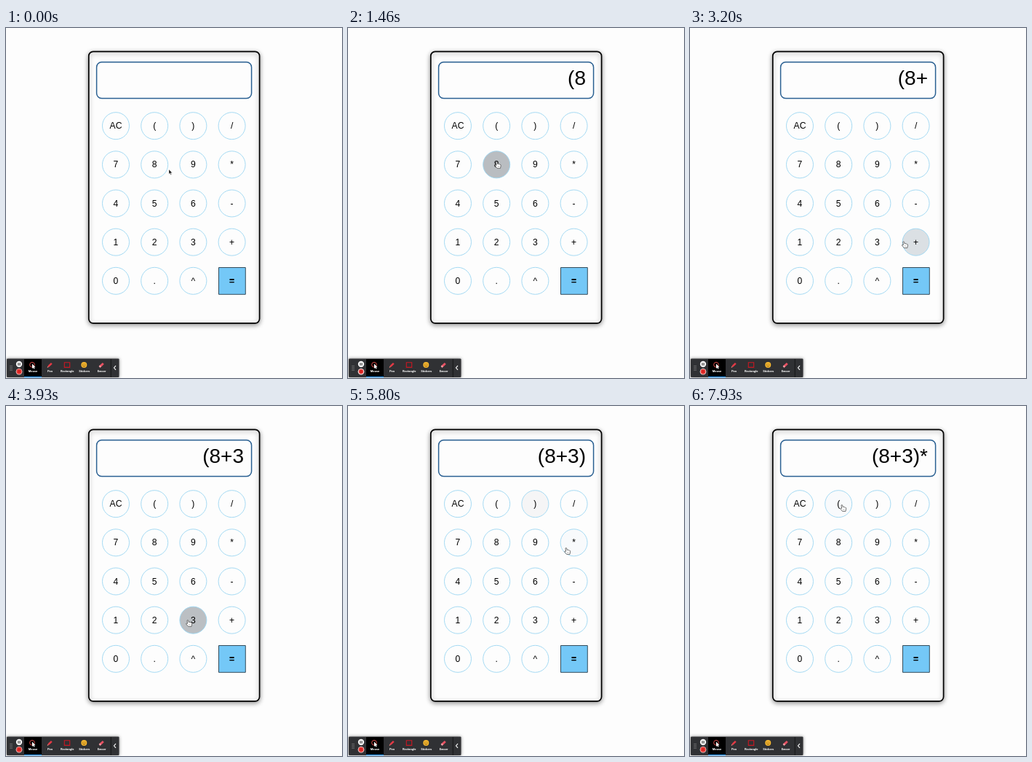
These frames come from a looping animation (462x480 px, 8 s). An HTML page with a canvas:

```html
<!DOCTYPE html>
<html lang="en">
<meta charset="utf-8">
<title>Calculator</title>
<style>
  html, body { margin: 0; width: 100%; height: 100%; overflow: hidden; background: #fdfdfd; }
  canvas { display: block; }
</style>
<canvas id="stage" width="462" height="480"></canvas>
<script>
const ctx = document.getElementById('stage').getContext('2d');
const LOOP = 8000, RADIUS = 18.5;
const SANS = '"Liberation Sans", Arial, sans-serif';

const buttons = ['AC', '(', ')', '/', '7', '8', '9', '*', '4', '5', '6', '-',
  '1', '2', '3', '+', '0', '.', '^', '='].map((label, i) => ({
  label, x: 151 + 53.2 * (i % 4), y: 134.2 + 53.15 * Math.floor(i / 4)
}));

// Pointer tip: time, x, y
const path = [
  [0, 224, 194], [550, 207, 134], [850, 207, 134], [1200, 204.5, 184], [1600, 204.5, 184],
  [2400, 292, 290], [2530, 294, 290], [2750, 306, 293], [3050, 306, 293],
  [3550, 250, 294], [4150, 250, 294], [4950, 254, 133], [5400, 254, 133],
  [5800, 300, 195], [6200, 303, 193], [6850, 303, 193], [7000, 294, 200],
  [7650, 212, 175], [7930, 209, 136], [8000, 208, 135]
];
const clicks = [[700, '('], [1360, '8'], [2850, '+'], [3800, '3'], [5350, ')'], [6690, '*']];

const clamp = v => Math.max(0, Math.min(1, v));
const ease = v => v * v * (3 - 2 * v);

function pointerAt(t) {
  t = Math.max(0, t);
  const i = Math.max(1, path.findIndex(p => p[0] >= t));
  const [t0, x0, y0] = path[i - 1], [t1, x1, y1] = path[i];
  const k = ease((t - t0) / (t1 - t0));
  return { x: x0 + (x1 - x0) * k, y: y0 + (y1 - y0) * k };
}

const isOver = (b, p, r = RADIUS) => Math.hypot(b.x - p.x, b.y - p.y) < r;

function hoverAmount(b, t) {
  let inside = 0;
  for (let i = 0; i < 12; i++) inside += isOver(b, pointerAt(t - i * 25), 18);
  return inside / 12;
}

function shape(path, fill, stroke, width = 1) {
  if (fill) { ctx.fillStyle = fill; ctx.fill(path); }
  if (stroke) { ctx.strokeStyle = stroke; ctx.lineWidth = width; ctx.stroke(path); }
}
function box(x, y, w, h, r, ...paint) {
  const p = new Path2D();
  p.roundRect(x, y, w, h, r);
  shape(p, ...paint);
}
function circle(x, y, r, ...paint) {
  const p = new Path2D();
  p.arc(x, y, r, 0, 7);
  shape(p, ...paint);
}
function line(d, color, width) { shape(new Path2D(d), null, color, width); }
function text(str, x, y, font, color = '#000', align = 'center') {
  ctx.font = font;
  ctx.textAlign = align;
  ctx.fillStyle = color;
  ctx.fillText(str, x, y);
}
function withShadow(color, blur, y, draw) {
  ctx.save();
  ctx.shadowColor = color;
  ctx.shadowBlur = blur;
  ctx.shadowOffsetY = y;
  draw();
  ctx.restore();
}

function drawRipple(b, t) {
  const click = clicks.find(c => c[1] === b.label && t >= c[0] && t < c[0] + 560);
  if (!click) return;
  const age = t - click[0], tip = pointerAt(click[0]);
  const fade = 1 - ease(clamp((age - 60) / 500));
  ctx.save();
  ctx.beginPath();
  ctx.arc(b.x, b.y, RADIUS, 0, 7);
  ctx.clip();
  circle(tip.x, tip.y, 5 + 33 * clamp(age / 180), `rgba(0,0,0,${0.235 * fade})`);
  ctx.restore();
}

function drawButton(b, t) {
  if (b.label === '=') {
    box(b.x - 18.1, b.y - 18.3, 36.8, 36.8, 0, '#74c8f7', '#263b49', 0.9);
  } else {
    circle(b.x, b.y, RADIUS, `rgba(25,118,210,${0.05 * hoverAmount(b, t)})`);
    drawRipple(b, t);
    circle(b.x, b.y, RADIUS, null, '#9bd6f2', 0.9);
  }
  text(b.label, b.x, b.y + 4.1, `12.2px ${SANS}`);
  if (b.label === '=') text('=', b.x, b.y + 4.1, `bold 12.2px ${SANS}`);
}

function drawPointer(t) {
  const { x, y } = pointerAt(t), before = pointerAt(t - 100);
  const overButton = buttons.some(b => isOver(b, before, 19));
  ctx.save();
  ctx.translate(x, y);
  ctx.lineJoin = 'round';
  if (overButton) {
    shape(new Path2D('M-1 0Q0-1 .8 .2L1.3 2.6Q2.5 1.8 3.1 2.8Q4.2 2.3 4.6 3.3Q5.8 3.2 5.7 4.6L5 8.4H.6L-2.4 4.8Q-2.4 3.4-.4 4.4Z'),
      '#fff', '#444', 0.75);
    line('M1.6 5V7M3.1 5V7', '#777', 0.4);
  } else {
    shape(new Path2D('M0 0V6.3L1.5 5L2.5 7.4L3.5 7L2.5 4.7H4.5Z'), '#111', '#fff', 0.4);
  }
  ctx.restore();
}

function drawToolbar(t) {
  withShadow('rgba(0,0,0,.5)', 4, 0, () => box(1, 453.5, 154.5, 25.5, 1, '#303134'));
  for (let i = 0; i < 8; i++) circle(6 + 2 * (i % 2), 463.3 + 2 * (i >> 1), 0.55, '#aaa');

  circle(18, 461, 4.2, '#f5f5f5');
  line('M16.9 459.2V462.8M19.1 459.2V462.8', '#333', 1.1);
  const pulse = 0.5 + 0.5 * Math.cos(t * Math.PI / 500);
  circle(18, 471.2, 4.3, '#f6dede');
  circle(18, 471.2, 3.1 + 0.5 * pulse, '#e53935');
  box(16.4, 469.6, 3.2, 3.2, 0.5, '#d8201f');

  box(25, 454, 24, 25, 0, '#000');
  box(25, 478, 24, 1.2, 0, '#2196f3');
  circle(36, 461.8, 3.4, null, '#ef5350', 0.9);
  shape(new Path2D('M36 460.5V467L37.5 465.8L38.5 467.8L39.5 467.3L38.6 465.3H40.5Z'), '#fff');

  line('M58.3 464.2L62.8 459.8', '#e53945', 2.5);
  line('M57 465.6L58.3 464.2', '#ff8a80', 1.1);
  box(80.3, 458.8, 7.4, 6.6, 0, null, '#c91823', 1.1);

  circle(107.3, 462, 4, '#f6b72f');
  circle(105.9, 461, 0.6, '#51340c');
  circle(108.7, 461, 0.6, '#51340c');
  line('M105.2 463Q107.3 465.4 109.4 463', '#6b410c', 0.7);

  line('M129.4 464.2L133.8 460', '#e75263', 3);
  line('M128.5 465L130 463.6', '#f5a2aa', 2.7);

  [['Mouse', 37], ['Pen', 60.5], ['Rectangle', 84.2], ['Stickers', 107.7], ['Eraser', 131.5]]
    .forEach(([label, x]) => text(label, x, 472.2, 'bold 4.1px Roboto, sans-serif', '#fff'));
  line('M144.3 454V479', '#111', 0.8);
  line('M151 463.2L148.5 466L151 468.8', '#fff', 1.1);
}

function draw(now) {
  const t = now % LOOP;
  ctx.fillStyle = '#fdfdfd';
  ctx.fillRect(0, 0, 462, 480);
  withShadow('rgba(0,0,0,.4)', 6, 2, () => box(113.8, 32.3, 234.8, 372.5, 6, '#fdfdfd', '#000', 1.7));
  box(124.6, 46.7, 213, 49.8, 7, '#fdfdfd', '#2a6092', 1.5);

  const shown = clicks.filter(c => t >= c[0] + 60).map(c => c[1]).join('');
  text(shown, 327, 77.5, `28px ${SANS}`, '#000', 'right');

  buttons.forEach(b => drawButton(b, t));
  drawToolbar(t);
  drawPointer(t);
}

const start = performance.now();
function tick() {
  draw(performance.now() - start);
  requestAnimationFrame(tick);
}
tick();
</script>
</html>
```
